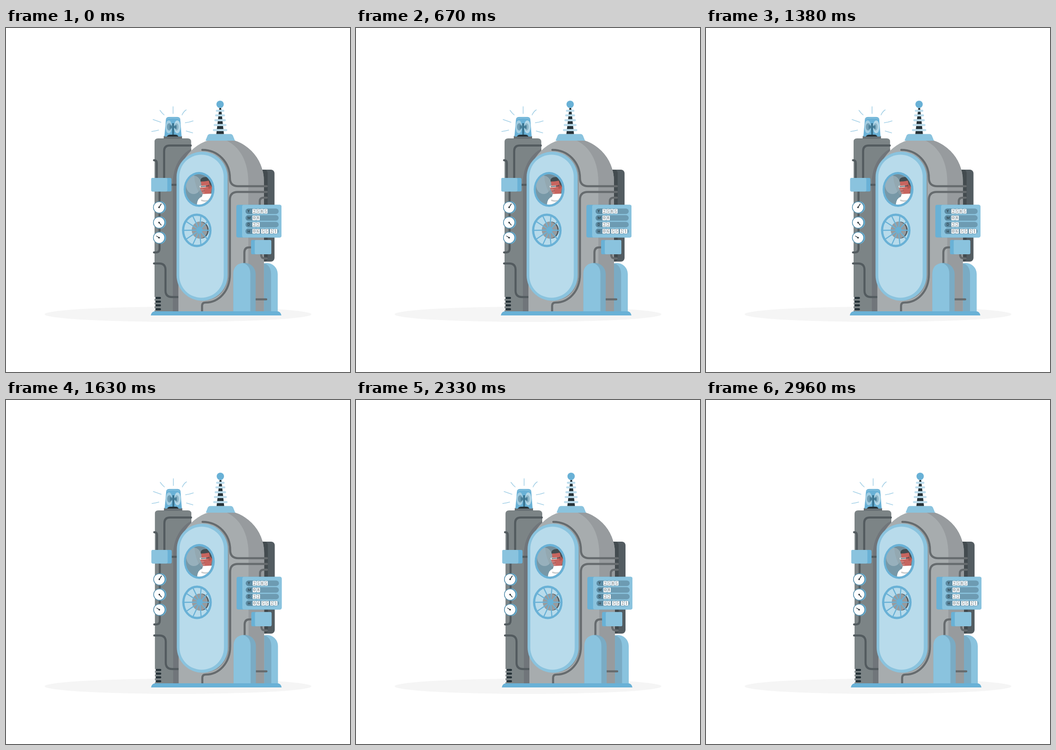
These frames come from a looping animation (748 by 748 pixels, 3 s). An HTML page:

```html
<!DOCTYPE html>
<html lang="en">
<head>
<meta charset="utf-8">
<title>Shaking machine</title>
<style>
  html, body { margin: 0; width: 100%; height: 100%; overflow: hidden; background: #fff; }
  svg { display: block; width: 100vw; height: 100vh; }
  .blue { fill: #69b1d6; }
  .sky { fill: #8ac3de; }
  .pale { fill: #b8dbeb; }
  .shade { fill: #7aabc4; }
  .dark { fill: #263238; }
  .line { fill: none; stroke-width: 4.5; stroke-linecap: round; }
  .label { font: 600 7.5px Lato, sans-serif; fill: #263238; }
  .digit { font: 8.5px "Noto Serif", serif; fill: #455a64; text-anchor: middle; }
</style>
</head>
<body>
<svg viewBox="0 0 748 748">
  <defs>
    <clipPath id="pane"><ellipse cx="419.5" cy="351" rx="28.8" ry="33"/></clipPath>
    <clipPath id="towerClip"><path d="M323 617V248q0-8 8-8h64q8 0 8 8V617z"/></clipPath>
    <clipPath id="bodyClip"><path id="bodyShape" d="M375 617V333a93 93 0 0 1 186 0V617z"/></clipPath>
  </defs>
  <ellipse cx="374" cy="622.5" rx="290" ry="16.5" fill="#f5f5f5"/>

  <g id="machine">
    <!-- back panel and rear tank -->
    <rect x="530" y="308" width="54" height="200" rx="8" fill="#535c61"/>
    <path d="M540 308h21q8 0 8 8v184q0 8-8 8h-21z" fill="#434b4f"/>
    <path class="sky" d="M543 617V535a24 24 0 0 1 48 0V617z"/>
    <path class="shade" d="M543 617V512h19q14 4 14.500 23V617z"/>

    <!-- tower -->
    <g clip-path="url(#towerClip)">
      <rect x="323" y="240" width="80" height="377" fill="#7c8486"/>
      <path d="M404 262C380 274 363 302 363 336V617h42z" fill="#70757a"/>
    </g>
    <g class="line" stroke="#535b5f">
      <path d="M402 255.500H356q-12 0-12 12V326M322 287.500q6 0 6 6V326M358 341h12"/>
      <path d="M334 355V480q0 8-8 8h-4M322 512h11q14 0 14 14v45q0 14 14 14h13"/>
    </g>
    <rect class="blue" x="316" y="326" width="44" height="29.500" rx="3"/>
    <path class="sky" d="M319 326h29q3 0 3 3v23.500q0 3-3 3h-29q-3 0-3-3V329q0-3 3-3z"/>
    <g id="vents"></g>
    <g id="gauges"></g>

    <!-- beacon -->
    <path d="M343 241v-4q0-3 3-3h34q3 0 3 3v4z" fill="#687074"/>
    <path class="dark" d="M350 236q1-4 5-4h16q4 0 5 4z"/>
    <path d="M344.500 236 348 198q.500-4 6-4.500h19q5.500.500 6 4.500l3 38h-7q-2-4-6-4h-12q-5 0-7 4z" fill="#69b1d6"/>
    <path d="M348 198q15-4 31 0" fill="none" stroke="#9acbe3"/>
    <path d="M361.500 207h4v25h-4z" fill="#37708c"/>
    <ellipse cx="354" cy="215" rx="7" ry="14" fill="#a2cde2"/>
    <ellipse cx="372.500" cy="215" rx="7" ry="14" fill="#b5d8e8"/>
    <ellipse cx="355" cy="215" rx="5" ry="8" fill="#719eb4"/>
    <ellipse cx="371" cy="215" rx="4.500" ry="8" fill="#8db5c8"/>
    <path d="M356 211l7 2v4l-7 3zM371 211l-6 2v4l6 3z" fill="#497f99"/>
    <path d="M363.500 171v15M335 179q4 6 9 10M392 178q-6 4-9 11M320 199l17 6M317 225q8-1 15-3M390 206q9-1 17-4M392 224l14 4"
      fill="none" stroke="#a5d1e7" stroke-width="1.600" stroke-linecap="round"/>

    <!-- body -->
    <use href="#bodyShape" fill="#a7acae"/>
    <path clip-path="url(#bodyClip)" d="M468 240C506 252 527 287 527 335V617h36V240z" fill="#979b9e"/>
    <g class="line" stroke="#666b6e">
      <path d="M427 265c35 0 60 28 60 61q0 18 18 18h62M567 356.500H504q-17 0-17 17V535c0 38-25 62-53 62q-7.500 0-7.500 7V616"/>
      <path d="M567 369h-7q-8 0-8 8v9M555 488v5q0 8 8 8h4M518.500 514V488q0-11 11-11h7M543 590h23"/>
    </g>

    <!-- antenna -->
    <path class="sky" d="M434 245l4-10q1.500-4.500 6-4.500h44q4.500 0 6 4.500l4 10z"/>
    <path class="dark" d="M464 174h4l6 56.500h-16.500z"/>
    <g id="rings" stroke="#bcdcec" stroke-width="4.600" stroke-linecap="round"></g>
    <circle class="blue" cx="465.700" cy="166" r="8"/>

    <!-- door -->
    <rect x="374" y="270" width="110.500" height="323" rx="55" fill="#8f9598"/>
    <rect class="sky" x="371" y="269" width="111" height="324" rx="55.500"/>
    <rect class="pale" x="377" y="275.500" width="96.500" height="311" rx="48.200"/>
    <ellipse class="blue" cx="420" cy="351" rx="33.500" ry="38"/>
    <g clip-path="url(#pane)">
      <rect x="386" y="313" width="66" height="76" fill="#7798a7"/>
      <path d="M410 317q16-4 39 14v25l-25 10q-16-28-14-49z" fill="#738d99"/>
      <path d="M427 343h19v28h-17z" fill="#a4534f"/>
      <path d="M424 334q8-7 22-2l3 13-5 15-15 2-4-7-3-7 3-5z" fill="#c7655f"/>
      <path d="M440 340q7-5 7 3 0 8-7 6z" fill="#b15750"/>
      <path d="M423 334q-1-10 12-10 15 1 15 24l-7-9-2-7q-9 2-18 2z" fill="#424c50"/>
      <path d="M421 343.500l14-1.500v4l-13 1z" fill="#fff"/>
      <path d="M423 345l19-2" stroke="#37474f" stroke-width="1.300"/>
      <path d="M426 355l6-1" stroke="#843e3b" stroke-width="1.500"/>
      <path d="M415 386q1-16 11-19l2-6 22-1v28z" fill="#fff"/>
      <path d="M425 373q10 4 19-1v3q-10 5-20 1z" fill="#c8cccd"/>
      <ellipse cx="408" cy="341" rx="16.500" ry="20" fill="#fff" opacity=".23"/>
      <ellipse cx="426" cy="356" rx="6" ry="7" fill="#cfe3ec" opacity=".18"/>
    </g>
    <ellipse cx="424" cy="439.500" rx="17" ry="18.500" fill="#535c61"/>
    <ellipse cx="421" cy="439.500" rx="17" ry="18.500" fill="#969ca0"/>
    <g id="spokes" stroke="#69b1d6" stroke-width="2.400"></g>
    <ellipse cx="415" cy="440" rx="29.700" ry="34" fill="none" stroke="#69b1d6" stroke-width="4.800"/>
    <ellipse class="blue" cx="421" cy="439.500" rx="6.500" ry="7"/>

    <!-- counter and front tank -->
    <rect class="blue" x="501" y="384.500" width="98" height="71" rx="4"/>
    <rect class="sky" x="513.500" y="384.500" width="85.500" height="71" rx="4"/>
    <g id="counter"></g>
    <rect class="blue" x="533" y="461" width="44" height="31" rx="3"/>
    <rect class="sky" x="541" y="461" width="36" height="31" rx="3"/>
    <path class="shade" d="M494.500 617V535a24.250 24.250 0 0 1 48.500 0V617z"/>
    <path class="sky" d="M494.500 617V535q0-21 20-24 17 4 17 24V617z"/>
    <path class="blue" d="M315 625q1.500-9 10-9H589q8.500 0 10 9z"/>
  </g>
</svg>
<script>
  const $ = id => document.getElementById(id);
  const fill = (id, items, draw) => { $(id).innerHTML = items.map(draw).join(''); };

  fill('vents', [587, 595, 603, 611.5], y =>
    `<path d="M322 ${y}h5" stroke="#fff" stroke-width="4"/>
     <path d="M327 ${y}h8" stroke="#263238" stroke-width="4.4" stroke-linecap="round"/>`);

  fill('gauges', [[390, 5, -8], [423, 5, 6], [456, -6, -4]], ([y, dx, dy]) =>
    `<circle cx="335" cy="${y}" r="13.3" fill="#69b1d6"/>
     <circle cx="333" cy="${y}" r="12.3" fill="#fff" stroke="#528dab" stroke-width="1.6"/>
     <circle class="dark" cx="333" cy="${y}" r="1.8"/>
     <path d="M333 ${y}l${dx} ${dy}" stroke="#263238" stroke-width="1.5"/>`);

  fill('rings', [180, 190, 200.5, 211, 222], (y, i) => {
    const half = 7 + i * 1.6;
    return `<path d="M${465.7 - half} ${y}h${2 * half}"/>`;
  });

  fill('spokes', [...Array(10).keys()], i => {
    const a = i * Math.PI / 5;
    return `<path d="M421 439.5L${415 + 29 * Math.cos(a)} ${440 + 33 * Math.sin(a)}"/>`;
  });

  fill('counter', ['Y2585', 'M08', 'D22', 'H06:55:21'], (row, i) => {
    const y = 398.5 + i * 14.5;
    let x = 536, out = `<rect x="521" y="${y - 6}" width="72" height="12" rx="6" fill="#6d9bb2"/>
      <path d="M536 ${y - 6}h-9a6 6 0 0 0 0 12h9z" fill="#5d8ca4"/>
      <text class="label" x="525.3" y="${y + 2.7}">${row[0]}</text>`;
    for (const c of row.slice(1)) {
      if (c === ':') {
        out += `<text class="digit" x="${x + .8}" y="${y + 2.5}">:</text>`;
        x += 2.2;
      } else {
        out += `<rect x="${x}" y="${y - 5}" width="7.5" height="10" rx="1" fill="#fff"/>
          <text class="digit" x="${x + 3.75}" y="${y + 3}">${c}</text>`;
        x += 8.4;
      }
    }
    return out;
  });

  // Horizontal shake: ten equal linear swings, advanced at 24 steps a second.
  const LOOP = 3000, STEP = LOOP / 72, LEAD = 35;
  const swing = [0, -1, 2, -4, 4, -4, 4, -4, 2, -1, 0];
  const start = performance.now();

  function frame(now) {
    const t = Math.max(0, now - start) % LOOP;
    const held = Math.floor((t + 5) / STEP) * STEP + LEAD;
    const p = (held % LOOP) / LOOP * 10, i = Math.floor(p);
    const x = 1.496 * (swing[i] + (swing[i + 1] - swing[i]) * (p - i));
    $('machine').setAttribute('transform', `translate(${x.toFixed(3)} 0)`);
    requestAnimationFrame(frame);
  }
  frame(start);
</script>
</body>
</html>
```
